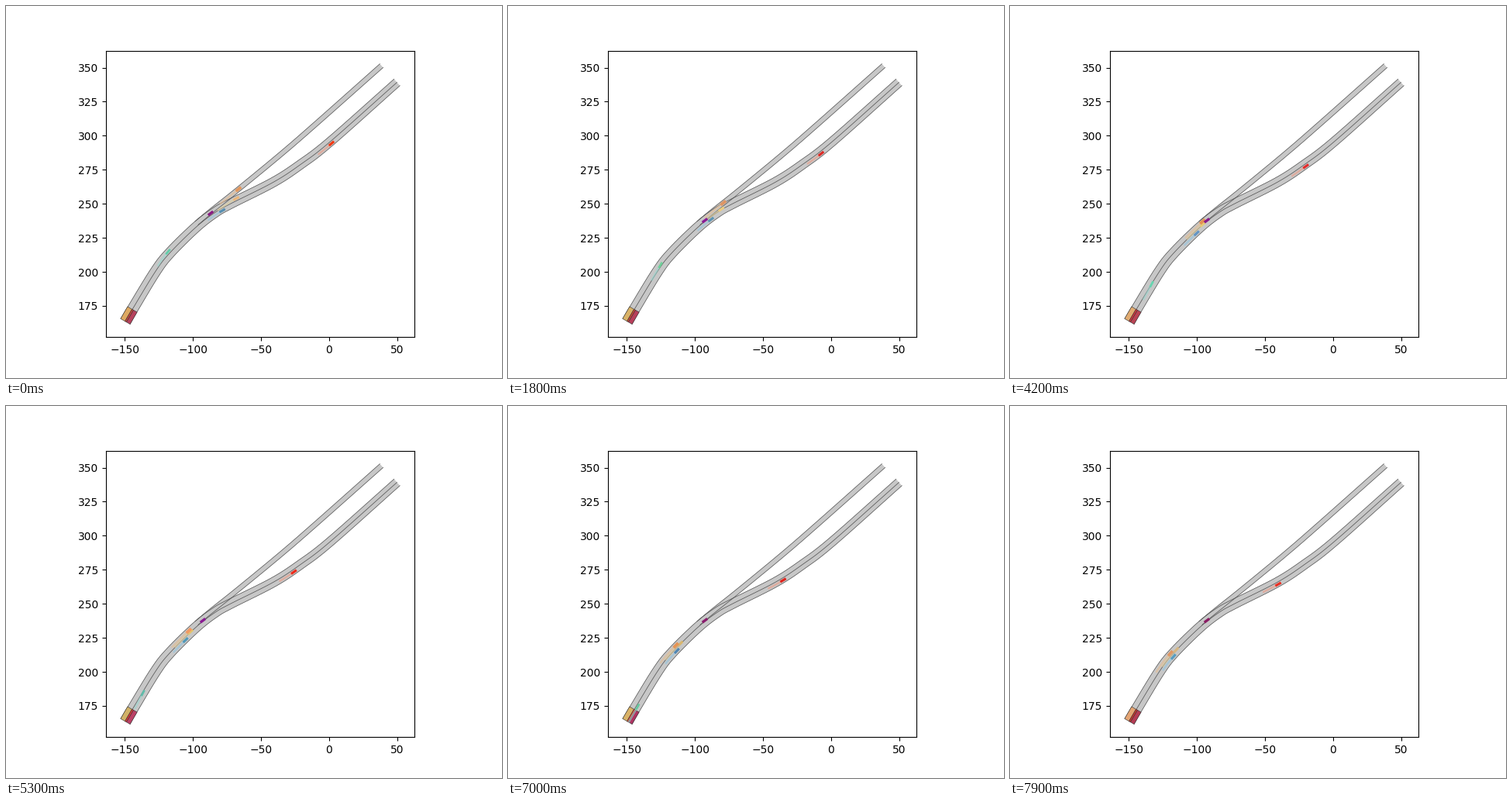
A matplotlib script that plays this animation: 640 by 480 pixels, repeating every 8000 ms.

```python
import numpy as np
import matplotlib.pyplot as plt
from matplotlib.animation import FuncAnimation
from matplotlib.patches import Polygon

FRAMES, STEP = 80, 100
SCALE = 1.757            # stage pixels per metre
X_LIM = (-163.77, 62.75)
Y_DATA = (161.66, 352.91)
HORIZON = 1.95           # seconds of predicted driving
ARRIVAL = 7.65           # the teal car reaches the goal
LANE = 2.9               # lane centre to road centre, in pixels


def world(pts):
    """Stage pixels to road coordinates."""
    p = np.asarray(pts, float)
    return np.column_stack([-150 + (p[:, 0] - 153.2) / SCALE,
                            175 + (386.95 - p[:, 1]) / SCALE])


def smooth(pts, n=12):
    """Catmull-Rom curve through the points."""
    p = np.asarray(pts, float)
    p = np.vstack([2 * p[0] - p[1], p, 2 * p[-1] - p[-2]])
    u = np.linspace(0, 1, n, endpoint=False)[:, None]
    parts = [b + u / 2 * (c - a + u * (2 * a - 5 * b + 4 * c - d
                                       + u * (3 * (b - c) + d - a)))
             for a, b, c, d in zip(p, p[1:], p[2:], p[3:])]
    return np.vstack(parts + [p[-2:-1]])


def shift(line, dist):
    """Curve moved sideways; dist may vary along it."""
    d = np.gradient(line, axis=0)
    d /= np.hypot(d[:, 0], d[:, 1])[:, None]
    normal = np.column_stack([-d[:, 1], d[:, 0]])
    return line + normal * np.reshape(dist, (-1, 1))


def ribbon(line, left, right):
    return world(np.vstack([shift(line, left), shift(line, right)[::-1]]))


def jitter(rgb, rng, amount=.05):
    return np.clip(rgb + rng.uniform(-amount, amount, 3), 0, 1)


fig = plt.figure(figsize=(6.4, 4.8), dpi=100)
ax = fig.add_subplot()
ax.set_aspect("equal")


def add_shape(**style):
    return ax.add_patch(Polygon([(0, 0)] * 3, **style))


def draw_road(line, start, end, sides):
    half = np.linspace(start, end, len(line))
    add_shape(fc="#c7c7c7", ec="none", zorder=1).set_xy(ribbon(line, half, -half))
    for side in sides:
        ax.plot(*world(shift(line, side * half)).T, color="#4c4c4c", lw=.5, zorder=2)


main = smooth([(504.5, 98.5), (418, 175.3), (380, 204.5), (345, 227.3), (290, 255),
               (270, 266.2), (245, 285.5), (211, 319), (192.5, 343), (163, 391.5),
               (154, 407)])
ramp = smooth([(484.5, 77), (400, 152), (355, 191), (300, 236.3), (263, 265.8),
               (246, 280)])
draw_road(main, 5.7, 7, (-1, 0, 1))
draw_road(ramp, 3.2, 3, (-1, 1))

# goal area at the road's end, in three strips
goal = []
end = main[[-13, -1]]
for left, right, rgb in ((7.1, .5, (.86, .68, .42)), (.5, -1.7, (.86, .25, .2)),
                         (-1.7, -7.1, (.71, .24, .36))):
    strip = add_shape(ec="#333333", lw=.4, zorder=3)
    strip.set_xy(ribbon(end, left, right))
    goal.append((strip, np.array(rgb)))


class Car:
    """Drives along a path from a starting x, with its planned way ahead."""

    def __init__(self, path, x, speed, rgb, tint, accel=0, width=3.2):
        self.path = np.vstack([path, path[-1] + 20 * (path[-1] - path[-2])])
        self.arc = np.r_[0, np.cumsum(np.hypot(*np.diff(self.path, axis=0).T))]
        self.start = np.interp(-x, -self.path[:, 0], self.arc)
        self.speed, self.accel, self.width = speed, accel, width
        self.rgb = np.array(rgb)
        self.plan = add_shape(fc=tint, alpha=.6, ec="none", zorder=4)
        self.body = add_shape(ec="none", zorder=5)

    def way(self, s):
        return np.column_stack([np.interp(s, self.arc, v) for v in self.path.T])

    def place(self, t, rng):
        s = self.start + self.speed * t + self.accel * t * t / 2
        half = self.width / 2
        self.body.set_xy(ribbon(self.way([s - 4.2, s + 4.2]), half, -half))
        self.body.set_facecolor(jitter(self.rgb, rng))
        ahead = self.way(np.linspace(s + 3, s + self.speed * HORIZON, 8))
        self.plan.set_xy(ribbon(ahead, 1.3, -1.3))

    def show(self, on):
        self.body.set_visible(on)
        self.plan.set_visible(on)


left_lane = shift(main, LANE)
right_lane = shift(main, -LANE)
merging = np.vstack([ramp, left_lane[left_lane[:, 0] < 238]])
drifting = shift(main, np.interp(main[:, 0], [274, 297], [.4, LANE]))
changing = shift(main, np.interp(main[:, 0], [165, 212], [-2, LANE]))

teal = Car(changing, 209, 11.8, (.42, .79, .65), "#9bd6cf", width=2.8)
cars = [
    Car(right_lane, 420, 11.5, (.9, .19, .13), "#ec9c86"),
    Car(drifting, 297, 14.6, (.88, .76, .46), "#e0cf9c", accel=-.29),
    Car(merging, 300, 15.8, (.92, .56, .37), "#e6bd93", width=4),
    Car(right_lane, 279, 11.5, (.36, .57, .74), "#93c4e0"),
    teal,
]
ego = add_shape(ec="none", zorder=6)


def place_ego(t, rng):
    """Brakes to a stop at the merge."""
    left = max(0, 1 - t / 1.8) ** 2
    p = np.array([254 + 10 * left, 276.8 - 9.3 * left])
    d = np.array([-3.2, 2.4])
    ego.set_xy(ribbon(np.array([p - d, p + d]), 1.7, -1.7))
    ego.set_facecolor((.54, .11, .5 + rng.uniform(-.12, .1)))


def update(i):
    t = i * STEP / 1000
    rng = np.random.default_rng(i)
    for strip, rgb in goal:
        strip.set_facecolor(jitter(rgb, rng, .04))
    for car in cars:
        car.place(t, rng)
    teal.show(t < ARRIVAL)
    place_ego(t, rng)

    # the view grows while the teal car's plan leaves the map
    low, high = Y_DATA
    if t < ARRIVAL:
        low = min(low, teal.plan.get_xy()[:, 1].min())
    pad = .05 * (high - low)
    ax.set_xlim(X_LIM)
    ax.set_ylim(low - pad, high + pad)
    return []


anim = FuncAnimation(fig, update, frames=FRAMES, interval=STEP,
                     repeat=True, repeat_delay=0, blit=False)
plt.show()
```
